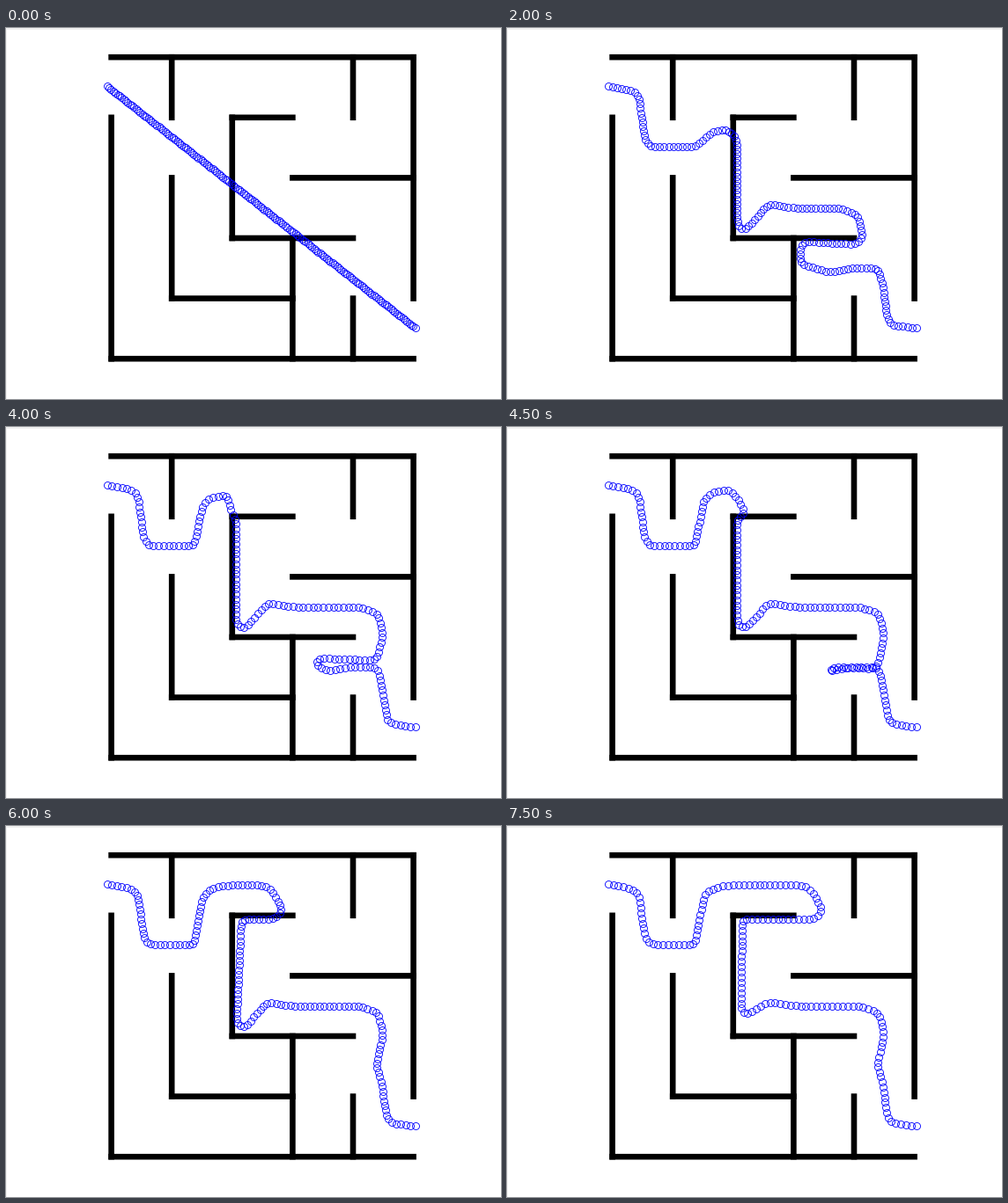
Write a matplotlib script that moves like this. It is 562x422 px and loops after 8 s.

```python
import numpy as np
import matplotlib.pyplot as plt
from matplotlib.animation import FuncAnimation

W, H, DPI = 562, 422, 100
FRAMES, STEP = 16, 500
BEADS = 150
CELL, X0, Y0 = 68.6, 119.6, 33.2


def px(n):
    """Pixels to points."""
    return n * 72 / DPI


# Wall segments in grid cells: (col, row) to (col, row)
WALLS = [
    ((0, 0), (5, 0)), ((0, 1), (0, 5)), ((0, 5), (5, 5)), ((5, 0), (5, 4)),
    ((1, 0), (1, 1)), ((4, 0), (4, 1)), ((2, 1), (3, 1)), ((2, 1), (2, 3)),
    ((3, 2), (5, 2)), ((1, 2), (1, 4)), ((1, 4), (3, 4)), ((2, 3), (4, 3)),
    ((3, 3), (3, 5)), ((4, 4), (4, 5)),
]

# The ends of the band hardly move
HEAD = [(114.8, 66.3), (131, 69), (145, 72), (150, 80), (156, 126),
        (162, 135), (213, 135.5)]
TAIL = [(420.5, 273), (426, 290), (432, 332), (438, 338), (464.8, 341.3)]


def upper_loop(t):
    """Climbs to the corridor, then is pushed right along the upper wall."""
    crest = 67.3 + 86.5 * max(0, 1 - (t - 1) / 9) ** 1.5
    tip = 256 + 14.6 * max(0, t - 8)
    tip_y = max(crest + 5, 97)
    back = max(261, tip - 10)
    slack = max(0, t - 12)
    floor = min(201 + 10 * (t - 1), 229 - 5 * slack)
    return [
        (223.5, crest + 12), (231, crest + 4.5), (250, crest),
        (max(250, tip - 22), crest), (max(252, tip - 12), crest + 6),
        (tip, tip_y), (back, tip_y + 9), (min(267, back), tip_y + 9),
        (261.5 + 1.4 * slack, floor - 4), (270, floor + 1),
    ]


def lower_loop(t):
    """Reaches past the end of the middle wall, then its fold shrinks away."""
    reach = min(428, 351 + 17.7 * (t - 1))
    left = 333 + 87 * np.clip((t - 6) / 6, 0, 1) ** 1.45
    under = 243 + 30 * np.clip((t - 6) / 3, 0, 1)
    fold = (420 - left) / 87
    drop = min(5, 8 * fold)
    hem = min(253 + 5 * (t - 1), 270)
    return [
        (297, 200), (322, 204.5), (max(322, reach - 28), 204.5),
        (reach - 6, 212), (reach, 237), (reach - 8, under + 3 * fold),
        (left + 6 * fold, under), (left, under + drop),
        (left, max(under + drop, hem)), (max(366, left), 273 + drop),
        (max(390, left), 273),
    ]


def spread(path, n):
    """Place n points at equal distances along a polyline."""
    path = np.array(path, float)
    dist = np.r_[0, np.cumsum(np.hypot(*np.diff(path, axis=0).T))]
    at = np.linspace(0, dist[-1], n)
    return np.column_stack([np.interp(at, dist, c) for c in path.T])


def soften(pts):
    """Round the corners a little, keeping the ends fixed."""
    out = pts.copy()
    out[1:-1] = (pts[:-2] + 2 * pts[1:-1] + pts[2:]) / 4
    return out


def band(i):
    if i == 0:
        return spread([HEAD[0], TAIL[-1]], BEADS)
    return soften(spread(HEAD + upper_loop(i) + lower_loop(i) + TAIL, BEADS))


fig = plt.figure(figsize=(W / DPI, H / DPI), dpi=DPI, facecolor="white")
ax = fig.add_axes([0, 0, 1, 1])
ax.set_xlim(0, W)
ax.set_ylim(H, 0)
ax.axis("off")

# Thin grey window edge
ax.fill_between([0, W], 0, 2, color="#f0f0f0", lw=0)
ax.fill_between([0, 1], 0, H, color="#f0f0f0", lw=0)

for (c0, r0), (c1, r1) in WALLS:
    ax.plot([X0 + CELL * c0, X0 + CELL * c1], [Y0 + CELL * r0, Y0 + CELL * r1],
            color="black", lw=px(6.6), solid_capstyle="projecting", snap=False)

beads, = ax.plot([], [], "o", ms=px(8), mfc="none", mec="blue", mew=px(0.85),
                 zorder=5)


def update(i):
    beads.set_data(*band(i).T)
    return beads,


anim = FuncAnimation(fig, update, frames=FRAMES, interval=STEP, repeat=True,
                     repeat_delay=0)
plt.show()
```
